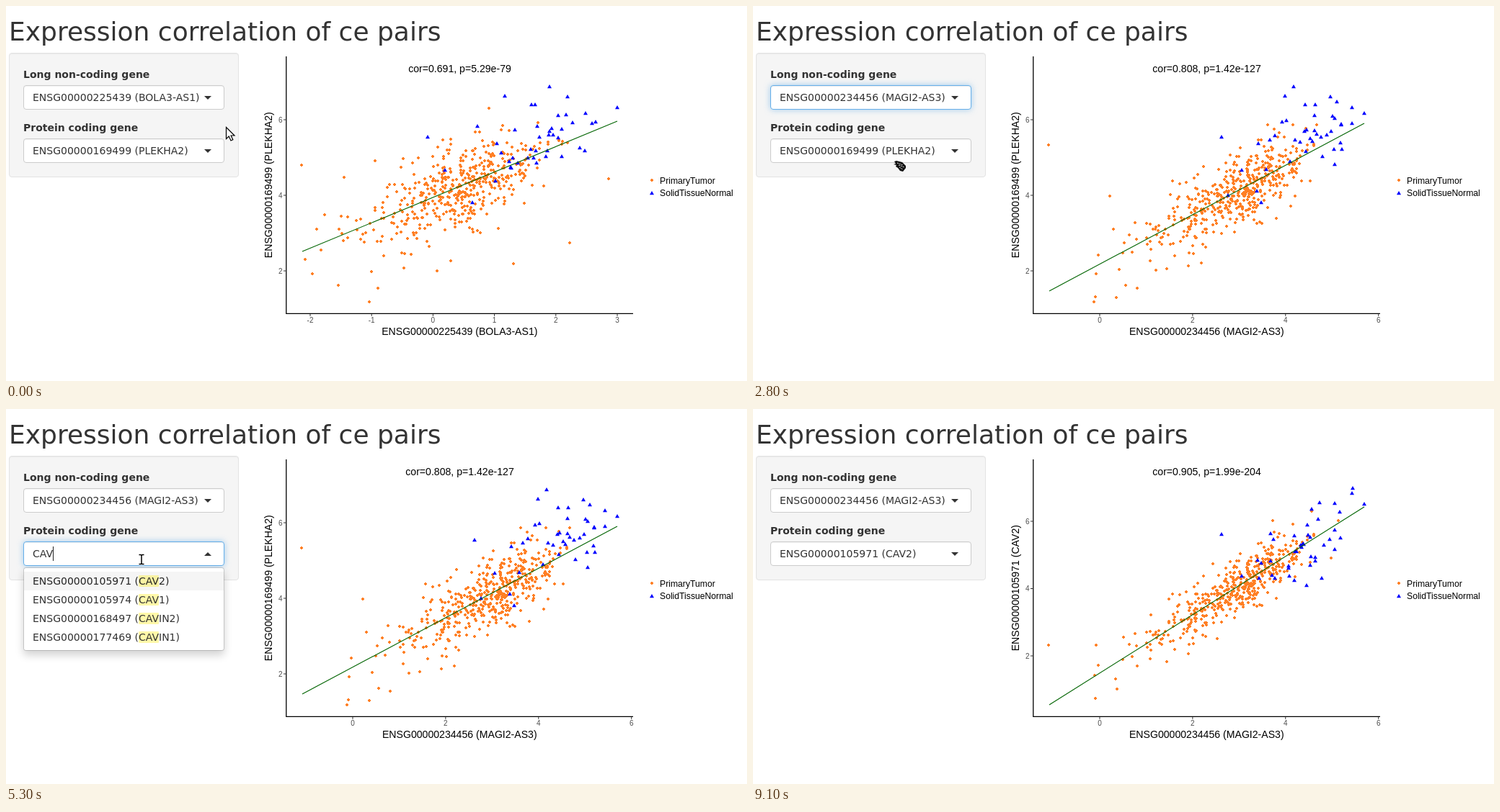
Write an HTML page that moves like this. It is 1028 by 521 pixels and loops after 9.2 s.

```html
<!DOCTYPE html>
<html lang="en">
<head>
<meta charset="utf-8">
<title>Expression correlation</title>
<style>
  html, body { margin: 0; width: 100%; height: 100%; overflow: hidden; background: #fff; }
  body { position: relative; font: 14px/20px "DejaVu Sans", sans-serif; color: #333; }
  * { box-sizing: border-box; }
  h1 { position: absolute; left: 4px; top: 16px; margin: 0; font-size: 36px; font-weight: 400; line-height: 40px; white-space: nowrap; }
  svg { position: absolute; left: 0; top: 0; }
  #plot text { font-family: "Liberation Sans", sans-serif; font-size: 14.1px; }
  #plot .tick { font-size: 10px; fill: #4d4d4d; }
  #plot .key { font-size: 12.2px; }
  .panel { position: absolute; left: 4px; top: 65px; width: 319px; padding: 19px 19px 4px; background: #f5f5f5;
    border: 1px solid #e3e3e3; border-radius: 4px; box-shadow: inset 0 1px 1px rgba(0,0,0,.05); }
  label { display: block; margin-bottom: 5px; font-weight: 700; }
  .select { position: relative; margin-bottom: 15px; }
  .box { position: relative; min-height: 34px; padding: 6px 12px; background: #fff; border: 1px solid #ccc; border-radius: 4px;
    box-shadow: inset 0 1px 1px rgba(0,0,0,.05); white-space: nowrap; }
  .box::after { content: ""; position: absolute; right: 17px; top: 50%; margin-top: -2px; border: solid transparent;
    border-width: 5px 5px 0; border-top-color: #333; }
  .open .box::after { border-width: 0 5px 5px; border-bottom-color: #333; }
  .focus .box { border-color: #66afe9; box-shadow: inset 0 1px 1px rgba(0,0,0,.075), 0 0 8px rgba(102,175,233,.6); }
  .caret { display: inline-block; width: 1px; height: 20px; vertical-align: top; background: #222; }
  .drop { position: absolute; z-index: 2; left: 0; top: calc(100% + 2px); width: 279px; background: #fff; background-clip: padding-box;
    border: 1px solid rgba(0,0,0,.15); border-radius: 4px; box-shadow: 0 6px 12px rgba(0,0,0,.175); }
  .view { position: relative; max-height: 200px; overflow: hidden; border-radius: 3px; }
  .list { padding: 5px 0; }
  .scrolls .list { margin-right: 13px; }
  .option { padding: 3px 12px; }
  .option.active { background: #f5f5f5; color: #262626; }
  .option b { font-weight: 400; background: rgba(255,237,40,.4); border-radius: 1px; }
  .bar { position: absolute; right: 0; top: 0; width: 13px; height: 200px; background: #d4d4d4; border: solid #c2c2c2; border-width: 0 1px; }
  .bar i { position: absolute; left: 0; width: 11px; height: 13px; background: #f2f2f2; }
  .bar i::after { content: ""; position: absolute; left: 3px; top: 5px; border: solid transparent; border-width: 0 3px 3px; border-bottom-color: #777; }
  .bar i.down { bottom: 0; }
  .bar i.down::after { border-width: 3px 3px 0; border-top-color: #777; }
  .bar u { position: absolute; left: -1px; width: 13px; border: 1px solid #a5a5a5; border-radius: 5px; background: #ececec; }
  .bar u::after { content: ""; position: absolute; left: 3px; top: calc(50% - 3px); width: 5px; height: 7px;
    background: repeating-linear-gradient(#aaa 0 1px, transparent 1px 3px); }
  #cursor { z-index: 5; pointer-events: none; overflow: visible; }
</style>
</head>
<body>
<h1>Expression correlation of ce pairs</h1>
<div class="panel">
  <label>Long non-coding gene</label><div class="select" id="lnc"></div>
  <label>Protein coding gene</label><div class="select" id="pc"></div>
</div>
<svg id="plot" width="1028" height="521"></svg>
<svg id="cursor" width="24" height="24"></svg>
<script>
const LOOP = 9200;
const $ = id => document.getElementById(id);
const gene = (id, name) => `ENSG00000${id} (${name})`;
const genes = text => text.split(' ').map(pair => gene(...pair.split(':')));

const BOLA = gene('225439', 'BOLA3-AS1'), MAGI = gene('234456', 'MAGI2-AS3');
const PLEK = gene('169499', 'PLEKHA2'), CAV2 = gene('105971', 'CAV2');

// shift: scrolled distance, thumb: top and height of the scroll thumb
const menus = {
  lnc: { thumb: [13, 34], rows: [BOLA, MAGI, ...genes('241158:ADAMTS9-AS1 234753:FOXP4-AS1 267505:AC005180.2 241684:ADAMTS9-AS2')] },
  pc: { shift: 17, thumb: [23, 33], rows: genes('151364:KCTD14 162999:DUSP19 136840:ST6GALNAC4 162543:UBXN10 169129:AFAP1L2 108830:RND2 169499:PLEKHA2 102934:PLLP') },
  c: { mark: 'C', thumb: [13, 60], rows: genes('105971:CAV2 105974:CAV1 151364:KCTD14 168497:CAVIN2 177469:CAVIN1 122786:CALD1 133392:MYH11C 154553:PDLIM3C') },
  ca: { mark: 'CA', thumb: [13, 130], rows: genes('105971:CAV2 105974:CAV1 122786:CALD1 168497:CAVIN2 177469:CAVIN1 183049:CAMK1D 151067:CACNA1C 118729:CASQ2') },
  cav: { mark: 'CAV', rows: genes('105971:CAV2 105974:CAV1 168497:CAVIN2 177469:CAVIN1') }
};

// cloud: centre, spread, share; tumor and normal hold the outlying points
const plots = [
  { title: 'cor=0.691, p=5.29e-79', x: BOLA, y: PLEK, line: [411, 341, 848, 160],
    xt: { from: -2, step: 1, n: 6, at: 422, gap: 85.2 }, yt: { at: 158, gap: 105 },
    cloud: [[643, 50, .72], [565, 62, .28]], noise: 29, blue: [735, 40, -18, 26],
    tumor: [410,221, 469,238, 512,215, 670,142, 836,240, 782,329, 704,358, 425,372, 415,352, 461,388, 504,411, 516,392, 617,354, 598,368],
    normal: [585,182, 609,228, 647,273, 692,125, 734,137, 754,112, 779,126, 848,141, 804,149, 813,163, 803,201] },
  { title: 'cor=0.808, p=1.42e-127', x: MAGI, y: PLEK, line: [411, 396, 848, 163],
    xt: { from: 0, step: 2, n: 4, at: 481, gap: 128.9 }, yt: { at: 158, gap: 105 },
    cloud: [[695, 38, .66], [613, 42, .34]], noise: 24, blue: [772, 35, -12, 23],
    tumor: [410,193, 495,264, 500,310, 473,411, 504,405, 517,388, 533,392, 476,372, 479,346, 508,366, 515,329, 559,367, 622,357, 714,165, 746,278, 579,262],
    normal: [650,182, 705,273, 678,228, 738,125, 750,112, 801,126, 848,149, 831,141, 780,137, 766,137, 831,163, 807,220] },
  { title: 'cor=0.905, p=1.99e-204', x: MAGI, y: CAV2, line: [411, 411, 848, 136],
    xt: { from: 0, step: 2, n: 4, at: 481, gap: 128.9 }, yt: { at: 156, gap: 93.5 },
    cloud: [[695, 38, .66], [613, 42, .34]], noise: 18, blue: [775, 34, -3, 20],
    tumor: [410,328, 476,328, 474,370, 479,356, 505,389, 503,375, 514,317, 552,286, 577,264, 638,215, 644,319, 721,155, 775,142, 802,207, 812,155, 533,357],
    normal: [650,174, 678,232, 832,110, 831,117, 848,132, 786,130, 768,245, 751,238, 780,211, 807,195, 705,214] }
];

function randomizer(seed) {
  const next = () => (seed = seed * 16807 % 2147483647) / 2147483647;
  const gauss = () => Math.sqrt(-2 * Math.log(next())) * Math.cos(2 * Math.PI * next());
  return { next, gauss };
}
const pairs = list => list.flatMap((v, i) => i % 2 ? [] : [[v, list[i + 1]]]);
const dot = ([x, y]) => `M${x - 2} ${y - 1}h1v-1h2v1h1v2h-1v1h-2v-1h-1z`;
const triangle = ([x, y]) => `M${x} ${y - 3}l3 5.2h-6z`;
const label = (x, y, text, attrs = 'text-anchor="middle"') => `<text x="${x}" y="${y}" ${attrs}>${text}</text>`;

function drawPlot(p) {
  const { next, gauss } = randomizer(4241);
  const [x1, y1, x2, y2] = p.line;
  const fit = x => y1 + (x - x1) * (y2 - y1) / (x2 - x1);
  const tumor = pairs(p.tumor), normal = pairs(p.normal);
  while (tumor.length < 485) {
    const [mid, spread] = next() < p.cloud[0][2] ? p.cloud[0] : p.cloud[1];
    const x = mid + spread * gauss(), y = fit(x) + p.noise * gauss();
    if (x > 425 && x < 785 && y > 160) tumor.push([Math.round(x), Math.round(y)]);
  }
  const [mid, spread, lift, noise] = p.blue;
  while (normal.length < 43) {
    const x = mid + spread * gauss(), y = fit(x) + lift + noise * gauss();
    if (x < 822 && y > 130) normal.push([Math.round(x), Math.round(y)]);
  }
  let ticks = '', labels = '';
  for (let i = 0; i < p.xt.n; i++) {
    const x = p.xt.at + i * p.xt.gap;
    ticks += `M${x} 428v3`;
    labels += label(x, 440, p.xt.from + i * p.xt.step, 'class="tick" text-anchor="middle"');
  }
  for (let i = 0; i < 3; i++) {
    const y = p.yt.at + i * p.yt.gap;
    ticks += `M385 ${y}h3`;
    labels += label(383.5, y + 3.7, 6 - 2 * i, 'class="tick" text-anchor="end"');
  }
  return `<path d="${tumor.map(dot).join('')}${dot([896, 242])}" fill="#ff7f24"/>
    <path d="${normal.map(triangle).join('')}${triangle([896, 260])}" fill="#00f"/>
    <path d="M${x1} ${y1}L${x2} ${y2}" stroke="#006400" stroke-width="1.1"/>
    <path d="${ticks}" stroke="#333"/>
    <path d="M388.8 70V427.4H870" fill="none" stroke="#000" stroke-width="1.3"/>
    ${labels}${label(629.5, 92, p.title)}${label(629.3, 457, p.x)}
    ${label(0, 0, p.y, 'text-anchor="middle" transform="translate(369 248.7) rotate(-90)"')}
    ${label(907, 247, 'PrimaryTumor', 'class="key"')}${label(907, 264, 'SolidTissueNormal', 'class="key"')}`;
}
const plotArt = plots.map(drawPlot);

const beam = 'M-3.5 -6.5h2.5l1 1l1 -1h2.5M0 -5.5v11M-3.5 6.5h2.5l1 -1l1 1h2.5';
const cursors = {
  arrow: '<path d="M.5 .5V16.5L4.2 13L7 19L9.8 17.7L7.1 12H12Z" fill="#fff" stroke="#000" stroke-width="1.2"/>',
  beam: `<g fill="none"><path d="${beam}" stroke="#fff" stroke-width="3.4"/><path d="${beam}" stroke="#000" stroke-width="1.5"/></g>`,
  hand: `<path d="M-8 -6l3 -1l8 2l5 5v3l-4 5l-4 -1l-3 -4l-3 -2l1 -2l-4 -1l3 -1z" fill="#111"/>
    <path d="M-4 -4l8 3M-2 -1l8 3M-1 2l5 3" stroke="#fff" stroke-width=".9" stroke-dasharray="2 1"/>`
};

// Each step changes only the listed properties.
const steps = [
  [0, { plot: 0, dim: 0, lnc: BOLA, pc: PLEK, focus: '', menu: '', active: 0, caret: 0, torn: 0, cursor: ['arrow', 305, 168] }],
  [700, { cursor: ['arrow', 294, 155] }],
  [800, { cursor: ['arrow', 273, 136] }],
  [900, { cursor: ['hand', 256, 124] }],
  [1000, { cursor: ['beam', 249, 120], focus: 'lnc', caret: 1 }],
  [1100, { menu: 'lnc', torn: 1 }],
  [1200, { torn: 0 }],
  [1600, { caret: 0 }],
  [2000, { cursor: ['hand', 225, 185] }],
  [2100, { cursor: ['hand', 206, 240], active: 2, caret: 1 }],
  [2400, { cursor: ['hand', 204, 222], active: 1 }],
  [2600, { lnc: MAGI, menu: '', caret: 0, dim: 1 }],
  [2800, { plot: 1, dim: 0 }],
  [3000, { cursor: ['hand', 198, 217] }],
  [3100, { cursor: ['hand', 190, 211] }],
  [3200, { cursor: ['beam', 188, 209], focus: 'pc' }],
  [3300, { menu: 'pc', active: 6 }],
  [3500, { caret: 1 }],
  [4000, { caret: 0 }],
  [4300, { pc: '', active: -1, caret: 1 }],
  [4400, { pc: 'C' }],
  [4600, { menu: 'c', active: 0 }],
  [4800, { pc: 'CA' }],
  [4900, { menu: 'ca' }],
  [5200, { pc: 'CAV' }],
  [5300, { menu: 'cav' }],
  [5800, { caret: 0 }],
  [6100, { cursor: ['beam', 184, 213] }],
  [6200, { cursor: ['hand', 177, 227] }],
  [6300, { cursor: ['hand', 169, 236], caret: 1 }],
  [6400, { cursor: ['hand', 165, 243] }],
  [6700, { cursor: ['arrow', 162, 236], pc: CAV2, menu: '', caret: 0, dim: 1 }],
  [6900, { plot: 2, dim: 0 }],
  [7400, { cursor: ['arrow', 104, 284] }],
  [7500, { cursor: null }],
  [9100, { focus: '' }]
];
const states = [];
steps.forEach(([, change], i) => states.push({ ...states[i - 1], ...change }));

function menuHtml(s) {
  const { rows, mark, shift = 0, thumb } = menus[s.menu];
  const options = rows.map((row, i) =>
    `<div class="option${i === s.active ? ' active' : ''}">${mark ? row.replaceAll(mark, '<b>$&</b>') : row}</div>`).join('');
  const bar = thumb ? `<div class="bar"><i></i><u style="top:${thumb[0]}px;height:${thumb[1]}px"></u><i class="down"></i></div>` : '';
  const tear = s.torn ? 'clip-path:polygon(0 0,100% 0,100% 72px,0 72px,0 82px,100% 82px,100% 127px,0 127px)' : '';
  return `<div class="drop" style="${tear}"><div class="view${thumb ? ' scrolls' : ''}">
    <div class="list" style="margin-top:${-shift}px">${options}</div>${bar}</div></div>`;
}

function drawSelect(id, s) {
  const focused = s.focus === id, open = focused && s.menu;
  const secondLine = open && id === 'lnc' ? '<br>' : '';
  const caret = focused && s.caret && (open || id === 'pc') ? '<span class="caret"></span>' : '';
  $(id).className = `select${focused ? ' focus' : ''}${open ? ' open' : ''}`;
  $(id).innerHTML = `<div class="box">${s[id]}${secondLine}${caret}${secondLine && '&#8203;'}</div>${open ? menuHtml(s) : ''}`;
}

let shownStep = -1, shownPlot = -1;
function render(s) {
  drawSelect('lnc', s);
  drawSelect('pc', s);
  if (s.plot !== shownPlot) $('plot').innerHTML = plotArt[shownPlot = s.plot];
  $('plot').style.opacity = s.dim ? .96 : 1;
  const [kind, x, y] = s.cursor || [];
  $('cursor').innerHTML = kind ? `<g transform="translate(${x} ${y})">${cursors[kind]}</g>` : '';
}
function tick() {
  const t = performance.now() % LOOP;
  const step = steps.findLastIndex(([start]) => start <= t);
  if (step !== shownStep) render(states[shownStep = step]);
  requestAnimationFrame(tick);
}
tick();
</script>
</body>
</html>
```
